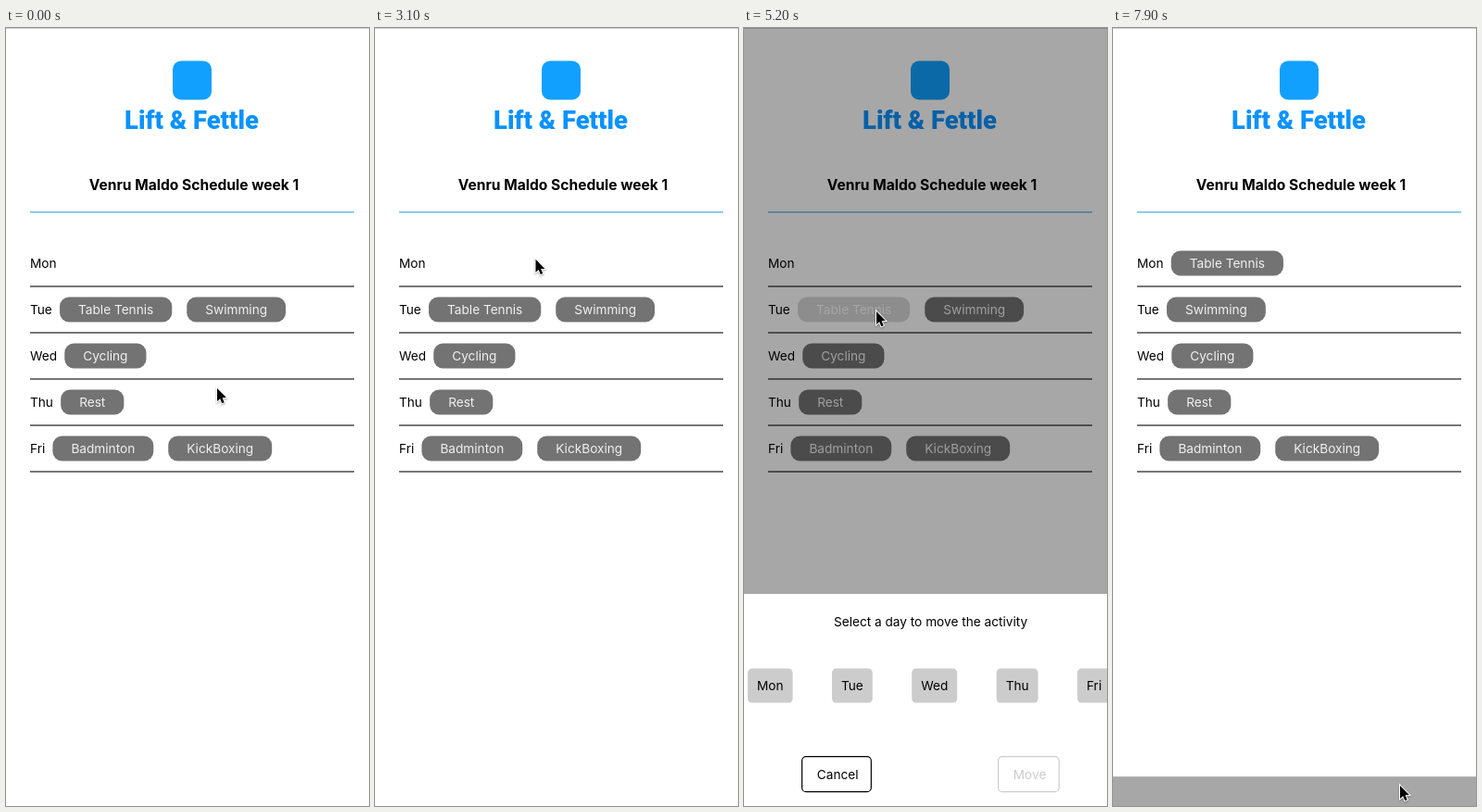
Recreate the animation shown at these times as an HTML page with a canvas. Size 392x840 px, loop 8000 ms.

```html
<!DOCTYPE html>
<html lang="en">
<head>
<meta charset="utf-8">
<title>Weekly schedule</title>
<style>
  html, body { margin: 0; width: 100%; height: 100%; overflow: hidden; background: #fff; }
  canvas { display: block; width: 392px; height: 840px; }
</style>
</head>
<body>
<canvas id="stage"></canvas>
<script>
const W = 392, H = 840, LOOP = 8000;
const canvas = document.getElementById('stage');
const ctx = canvas.getContext('2d');
const dpr = window.devicePixelRatio || 1;
canvas.width = W * dpr;
canvas.height = H * dpr;

const BODY = '13.65px Inter, sans-serif';
const TITLE = '700 15.6px Inter, sans-serif';
const BRAND = 'Lift & Fettle';
const DAYS = ['Mon', 'Tue', 'Wed', 'Thu', 'Fri'];

const OPEN = 4656, CLOSE = 7656.8, PICK = 6450, ENABLE = 6580;
const SCREEN_TOP = -35;          // the app's screen begins above the stage
const SCREEN_H = H - SCREEN_TOP;
const SHEET_TOP = 611;
const LEFT = 26, ROW_H = 50;

// Pointer moves: start, end, then the place reached
const HOME = [227, 388];
const MOVES = [
  [0, 900, 65, 450],
  [1000, 1400, 178, 319],
  [2060, 2300, 150, 306],
  [2550, 3200, 174, 245],
  [3330, 3500, 142, 305],
  [5520, 6200, 41, 704],
  [6550, 7450, 309, 817]
];

function ramp(t, a, b) {
  const v = Math.min(1, Math.max(0, (t - a) / (b - a)));
  return v * v * (3 - 2 * v);
}

// Critically damped spring from 0 to 1
function spring(ms) {
  const u = Math.max(0, ms) * 0.021;
  return 1 - (1 + u) * Math.exp(-u);
}

function pointerAt(t) {
  return MOVES.reduce(([x, y], [a, b, toX, toY]) => {
    const k = ramp(t, a, b);
    return [x + (toX - x) * k, y + (toY - y) * k];
  }, HOME);
}

// A grey seen through the given opacity on white
function grey(level, alpha) {
  const v = Math.round(255 - (255 - level) * alpha);
  return `rgb(${v},${v},${v})`;
}

function widthOf(str) {
  ctx.font = BODY;
  return ctx.measureText(str).width;
}

function text(str, x, y, color = '#000', align = 'left', font = BODY) {
  ctx.font = font;
  ctx.fillStyle = color;
  ctx.textAlign = align;
  ctx.fillText(str, x, y);
}

function box(x, y, w, h, r) {
  ctx.beginPath();
  ctx.roundRect(x, y, w, h, r);
}

function rule(y, color, h) {
  ctx.fillStyle = color;
  ctx.fillRect(LEFT, y, 350, h);
}

// Draws a pill around its label and returns its width
function pill(label, x, cy, alpha) {
  const w = widthOf(label) + 40;
  ctx.fillStyle = grey(115, alpha);
  box(x, cy - 13.5, w, 27, 10);
  ctx.fill();
  text(label, x + 20, cy + 5, grey(240, alpha));
  return w;
}

function brand() {
  ctx.fillStyle = '#12a0ff';
  box(180, 35.5, 42, 42, 9);
  ctx.fill();
  const face = size => `900 condensed ${size}px Roboto, "Open Sans", sans-serif`;
  ctx.font = face(36);
  const size = Math.min(36, 36 * 145 / ctx.measureText(BRAND).width);
  text(BRAND, 200.5, 99 + size * 0.355, '#0a92ff', 'center', face(size));
}

function activities(t) {
  const moved = t >= CLOSE;
  return [
    moved ? ['Table Tennis'] : [],
    moved ? ['Swimming'] : ['Table Tennis', 'Swimming'],
    ['Cycling'],
    ['Rest'],
    ['Badminton', 'KickBoxing']
  ];
}

function schedule(t) {
  ctx.fillStyle = '#fff';
  ctx.fillRect(0, 0, W, H);
  ctx.fillStyle = '#cdcdcd';
  ctx.fillRect(0, 0, W, 1);

  brand();
  text('Venru Maldo Schedule week 1', 203, 174.5, '#000', 'center', TITLE);
  rule(198.2, '#55b1dc', 1.3);

  const pressed = ramp(t, 4150, 4300) - ramp(t, 5150, 5400);
  activities(t).forEach((list, i) => {
    const cy = 254 + i * ROW_H;
    text(DAYS[i], LEFT, cy + 5);
    rule(cy + 24.3, '#3c3c3c', 1.4);
    let x = LEFT + widthOf(DAYS[i]) + 8.2;
    for (const name of list) {
      const alpha = name === 'Table Tennis' ? 1 - 0.8 * pressed : 1;
      x += pill(name, x, cy, alpha) + 16;
    }
  });
}

function actionButton(label, x, color) {
  ctx.strokeStyle = color;
  ctx.lineWidth = 1.2;
  box(x, 786.6, widthOf(label) + 30, 38, 4.5);
  ctx.stroke();
  text(label, x + 16.2, 811, color);
}

function sheet(t) {
  const shown = spring(t - OPEN) - spring(t - CLOSE);
  if (shown <= 0) return;
  ctx.save();
  ctx.translate(0, SCREEN_H * (1 - shown));
  ctx.fillStyle = 'rgba(0,0,0,0.345)';
  ctx.fillRect(0, SCREEN_TOP, W, SHEET_TOP - SCREEN_TOP);
  ctx.fillStyle = '#fff';
  ctx.fillRect(0, SHEET_TOP, W, H - SHEET_TOP);

  text('Select a day to move the activity', 201.5, 646, '#000', 'center');
  let x = 4;
  for (const day of DAYS) {
    const w = widthOf(day) + 20;
    ctx.fillStyle = day === 'Mon' && t >= PICK ? '#067a06' : '#ccc';
    box(x, 691.5, w, 37, 4.5);
    ctx.fill();
    text(day, x + 10, 715);
    x += w + 42.4;
  }

  actionButton('Cancel', 62.6, '#000');
  const pressed = ramp(t, 7400, 7520) - ramp(t, 7600, 7800);
  actionButton('Move', 274.6, t < ENABLE ? '#ccc' : grey(0, 1 - 0.8 * pressed));
  ctx.restore();
}

function pointer(t) {
  const [x, y] = pointerAt(t);
  ctx.save();
  ctx.translate(x + 1, y + 1);
  const arrow = new Path2D('M0 0V14L3.2 11.2L5.3 16.2L7.7 15.2L5.6 10.3L9.9 10.1Z');
  ctx.strokeStyle = '#fff';
  ctx.lineWidth = 2;
  ctx.shadowColor = 'rgba(0,0,0,0.35)';
  ctx.shadowBlur = 2 * dpr;
  ctx.shadowOffsetY = dpr;
  ctx.stroke(arrow);
  ctx.shadowColor = 'transparent';
  ctx.fillStyle = '#000';
  ctx.fill(arrow);
  ctx.restore();
}

function draw(t) {
  ctx.setTransform(dpr, 0, 0, dpr, 0, 0);
  schedule(t);
  sheet(t);
  pointer(t);
}

const start = performance.now();
function frame() {
  draw((performance.now() - start) % LOOP);
  requestAnimationFrame(frame);
}
frame();
</script>
</body>
</html>
```
